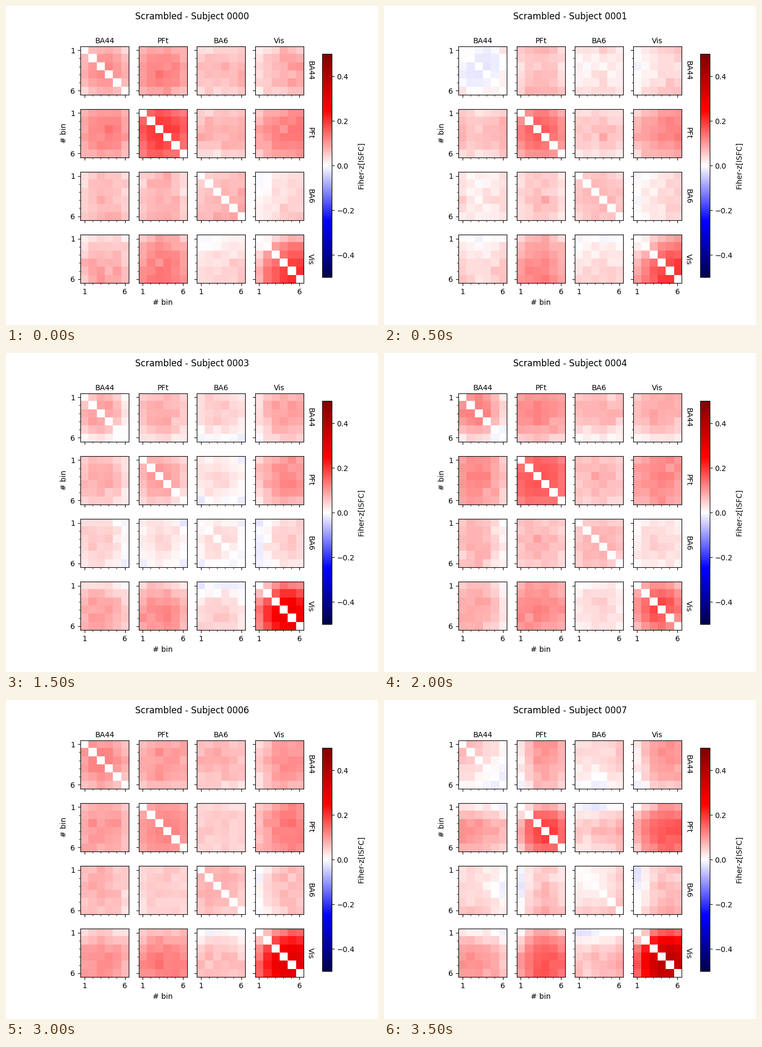
Animation of 700 by 600 pixels, one loop 4 s. Source, as a matplotlib script:

```python
import numpy as np
import matplotlib.pyplot as plt
from itertools import combinations
from matplotlib.animation import FuncAnimation

plt.rcParams["text.kerning_factor"] = 6

REGIONS = ["BA44", "PFt", "BA6", "Vis"]
SUBJECTS = 8
BINS = 6
STEP = 0.005  # size of one level unit
LIMIT = 0.5

# Level at the first, middle and last bin of each region, for key subjects;
# the other subjects lie between their neighbours.
KEYS = {
    0: [(4, 12, 4), (12, 20, 11), (4, 7, 9), (-4, 15, 20)],
    1: [(1, -3, 3), (9, 16, 7), (4, 7, 5), (-2, 14, 21)],
    3: [(6, 9, -4), (5, 10, 1), (0, 4, -3), (-1, 25, 24)],
    4: [(9, 12, -5), (13, 17, 11), (4, 8, 4), (4, 17, 9)],
    6: [(8, 12, 3), (8, 12, 9), (7, 8, 4), (-1, 27, 29)],
    7: [(7, 4, -4), (-2, 19, 11), (1, 2, 8), (-4, 34, 34)],
}
# How much of its own level a region shares with the others, and the
# extra level of each pair of regions.
SHARE = [0.7, 0.7, 0.7, 0.4]
PAIR_LEVEL = dict(zip(combinations(range(4), 2), [3, 1, 2, -3, 5, -4]))

t = np.linspace(0, 1, BINS)
PARABOLA = np.array([(1 - t) * (1 - 2 * t), 4 * t * (1 - t), t * (2 * t - 1)])


def profiles(number):
    """Smooth curve over the bins for each region."""
    lower = max(k for k in KEYS if k <= number)
    upper = min(k for k in KEYS if k >= number)
    mean = (np.array(KEYS[lower]) + np.array(KEYS[upper])) / 2
    return mean @ PARABOLA


def blocks(number):
    """Correlation block for every pair of regions."""
    rng = np.random.default_rng(number)
    curves = profiles(number)

    def grain():
        return rng.normal(0, 1.5, (BINS, BINS))

    grid = {}
    for i, curve in enumerate(curves):
        block = np.add.outer(curve, curve) + grain()
        block = (block + block.T) / 2
        np.fill_diagonal(block, 0)
        grid[i, i] = block * STEP
    for (i, j), level in PAIR_LEVEL.items():
        block = np.add.outer(SHARE[i] * curves[i], SHARE[j] * curves[j])
        block = (block + level + grain()) * STEP
        grid[i, j], grid[j, i] = block, block.T
    return grid


fig, axes = plt.subplots(4, 4, figsize=(7, 6), dpi=100,
                         sharex=True, sharey=True)
fig.subplots_adjust(left=0.2, right=0.8, bottom=0.125, top=0.88)
title = fig.suptitle("", y=0.9817)

images = {}
for (i, j), ax in np.ndenumerate(axes):
    images[i, j] = ax.imshow(
        np.zeros((BINS, BINS)), cmap="seismic", vmin=-LIMIT, vmax=LIMIT,
        extent=(0.5, BINS + 0.5, BINS + 0.5, 0.5))
    for axis in (ax.xaxis, ax.yaxis):
        axis.set_ticks([1, BINS])
        axis.set_ticks(range(2, BINS), minor=True)

for k, name in enumerate(REGIONS):
    axes[0, k].set_title(name, fontsize=10, pad=4)
    axes[k, 3].yaxis.set_label_position("right")
    axes[k, 3].set_ylabel(name, rotation=270, va="bottom")
axes[1, 0].set_ylabel("# bin")
axes[3, 1].set_xlabel("# bin")

bar_ax = fig.add_axes([0.85, 0.15, 0.025, 0.7])
fig.colorbar(images[0, 0], cax=bar_ax, label="Fiher-z[ISFC]")


def update(number):
    title.set_text(f"Scrambled - Subject {number:04d}")
    for key, block in blocks(number).items():
        images[key].set_data(block)
    return [title, *images.values()]


anim = FuncAnimation(fig, update, frames=SUBJECTS, interval=500,
                     repeat=True, repeat_delay=0, blit=False)
plt.show()
```
